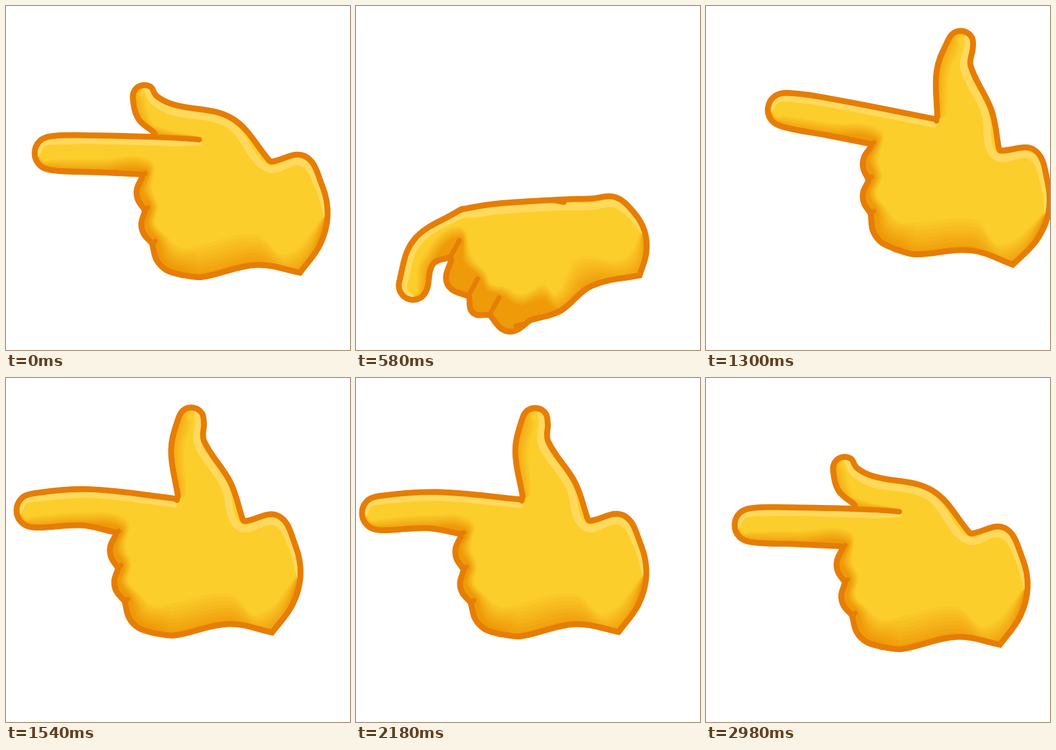
Animation of 512x512 px, one loop 3 s. Source, as an HTML page with a canvas:

```html
<!DOCTYPE html>
<html lang="en">
<head>
<meta charset="utf-8">
<title>Pointing hand</title>
<style>
html, body { margin: 0; width: 100%; height: 100%; overflow: hidden; background: #fff; }
canvas { display: block; width: 100vmin; height: 100vmin; }
</style>
</head>
<body>
<canvas id="stage"></canvas>
<script>
const SIZE = 512, LOOP = 3000, STEP = 20;
const canvas = document.getElementById('stage');
const ctx = canvas.getContext('2d');
const scale = Math.max(1, window.devicePixelRatio || 1);
canvas.width = canvas.height = SIZE * scale;

const YELLOW = [252, 206, 44], DARK = [238, 154, 9];
const EDGE = '#e67d05', LIGHT = '#ffd95c';
const EDGE_WIDTH = 8, BANDS = 9, THUMB_SIZE = 22;

// A pose holds the joints of the hand as x, y pairs.
// finger: tip centre, upper side, lower side
// thumb: crotch, left side, tip centre, right side, back, end of the inner line
// knuckles: four creases; wrist: notch, top, bottom; palm: heel, underside
// turn: finger angle and radius, thumb angle and radius, amount of curl
const aim = {
  finger: [46, 199, 110, 169, 115, 231],
  thumb: [269, 176, 258, 108, 291, 63, 314, 92, 354, 153, 274, 179],
  knuckles: [177, 234, 181, 285, 192, 335, 239, 384],
  wrist: [373, 208, 424, 200, 417, 381],
  palm: [351, 369, 270, 387],
  turn: [180, 29, -80, 23, 0]
};
const curl = {
  finger: [85, 412, 84, 341, 117, 383],
  thumb: [152, 297, 156, 295, 162, 294, 205, 287, 295, 281, 310, 284],
  knuckles: [138, 374, 165, 431, 197, 459, 261, 467],
  wrist: [350, 279, 387, 277, 425, 400],
  palm: [352, 416, 306, 453],
  turn: [105, 25, -110, 0, 1]
};
const PARTS = Object.keys(aim);

const mapPose = fn => Object.fromEntries(PARTS.map(part => [part, aim[part].map((_, i) => fn(part, i))]));
const halfway = (a, b) => mapPose((part, i) => (a[part][i] + b[part][i]) / 2);

// Shifts a pose, turning it about its first crease.
function move(pose, dx, dy, deg = 0) {
  const [px, py] = pose.knuckles;
  const c = Math.cos(deg * Math.PI / 180), s = Math.sin(deg * Math.PI / 180);
  return mapPose((part, i) => {
    const list = pose[part];
    if (part === 'turn') return list[i] + (i === 0 || i === 2 ? deg : 0);
    const x = list[i - i % 2] - px, y = list[i - i % 2 + 1] - py;
    return i % 2 ? py + dy + x * s + y * c : px + dx + x * c - y * s;
  });
}

const folded = {
  ...aim,
  thumb: [196, 171, 172, 150, 184, 115, 228, 123, 316, 144, 266, 175],
  turn: [180, 29, -100, 21, 0]
};
const point = move(folded, 22, 20);
const windup = move(aim, 65, -26, 8.5);
const back = move(aim, 13, 0);
const poke = { ...move(aim, -25, 1), finger: [34, 201, 120, 166, 105, 227] };
const droop = {
  ...halfway(point, curl),
  finger: [71, 314, 105, 254, 121, 308],
  thumb: [138, 244, 138, 238, 151, 234, 195, 231, 310, 237, 312, 242],
  knuckles: [168, 300, 183, 355, 202, 396, 246, 427],
  turn: [142, 24, -110, 9, 0.5]
};

const POKES = [1590, 1890, 2190];
const KEYS = [
  [0, point], [340, droop], [560, move(curl, 0, 4)], [940, curl], [1065, droop], [1310, windup],
  ...POKES.flatMap(time => [[time, poke], [time + 140, back]]),
  [2440, back], [LOOP, point]
];

// Monotone cubic interpolation: eases at turning points, flows through the rest.
function poseAt(time) {
  let k = 0;
  while (k < KEYS.length - 2 && time >= KEYS[k + 1][0]) k++;
  const span = KEYS[k + 1][0] - KEYS[k][0];
  const u = (time - KEYS[k][0]) / span;
  return mapPose((part, i) => {
    const value = j => KEYS[j][1][part][i];
    const slope = j => j < 0 || j > KEYS.length - 2 ? 0 :
      (value(j + 1) - value(j)) / (KEYS[j + 1][0] - KEYS[j][0]);
    const tangent = j => {
      const a = slope(j - 1), b = slope(j);
      return a * b > 0 ? 2 * a * b / (a + b) : 0;
    };
    return value(k) + (value(k + 1) - value(k)) * u * u * (3 - 2 * u) +
      span * u * (1 - u) * (tangent(k) * (1 - u) - tangent(k + 1) * u);
  });
}

const pairs = list => list.filter((_, i) => i % 2 === 0).map((x, i) => ({ x, y: list[i * 2 + 1] }));
const sharp = p => ({ ...p, corner: true });
const add = (p, x, y) => ({ x: p.x + x, y: p.y + y });

function unit(a, b) {
  const dx = b.x - a.x, dy = b.y - a.y, d = Math.hypot(dx, dy) || 1;
  return { x: dx / d, y: dy / d };
}

// Half circle around a fingertip that points along deg.
function cap(center, deg, radius) {
  return [-90, -45, 0, 45, 90].map(turn => {
    const a = (deg + turn) * Math.PI / 180;
    return add(center, Math.cos(a) * radius, Math.sin(a) * radius);
  });
}

// Points between a and b that bulge to the left of the way.
function bulge(a, b, amount, count) {
  return Array.from({ length: count }, (_, i) => {
    const u = (i + 1) / (count + 1), h = 4 * u * (1 - u) * amount;
    const dx = b.x - a.x, dy = b.y - a.y;
    return { x: a.x + dx * u + dy * h, y: a.y + dy * u - dx * h };
  });
}

// Smooth curve through points, with sharp turns at corners.
function trace(pts, { closed = false, join = false } = {}) {
  const n = pts.length;
  const at = i => closed ? pts[(i + n) % n] : pts[Math.min(n - 1, Math.max(0, i))];
  if (join) ctx.lineTo(pts[0].x, pts[0].y);
  else ctx.moveTo(pts[0].x, pts[0].y);
  for (let i = 0; i < (closed ? n : n - 1); i++) {
    const a = at(i), b = at(i + 1);
    const from = unit(a.corner ? a : at(i - 1), b);
    const to = unit(a, b.corner ? b : at(i + 2));
    const reach = Math.hypot(b.x - a.x, b.y - a.y) * 0.36;
    ctx.bezierCurveTo(a.x + from.x * reach, a.y + from.y * reach,
      b.x - to.x * reach, b.y - to.y * reach, b.x, b.y);
  }
}

// Moves points sideways, to the left of the way.
function offset(pts, depth) {
  return pts.map((p, i) => {
    const dir = unit(pts[Math.max(0, i - 1)], pts[Math.min(pts.length - 1, i + 1)]);
    const d = typeof depth === 'number' ? depth : depth[i];
    return { ...p, ...add(p, dir.y * d, -dir.x * d) };
  });
}

function stroke(pts, color, width, closed = false) {
  ctx.beginPath();
  trace(pts, { closed });
  ctx.strokeStyle = color;
  ctx.lineWidth = width;
  ctx.stroke();
}

const mix = t => `rgb(${YELLOW.map((c, i) => Math.round(DARK[i] + (c - DARK[i]) * t))})`;

// Stepped gradient between a rim and the same line pushed inwards.
function shade(pts, depths, rim, inset = 0) {
  for (let k = BANDS - 1; k >= 0; k--) {
    const t = k / BANDS;
    ctx.beginPath();
    trace(offset(pts, depths.map(d => inset + d * t)));
    trace(rim, { join: true });
    ctx.closePath();
    ctx.fillStyle = mix(t);
    ctx.fill();
  }
}

function draw(time) {
  const pose = poseAt(time);
  const [tip, upper, lower] = pairs(pose.finger);
  const [crotch, left, thumbTip, right, spine, lineEnd] = pairs(pose.thumb);
  const creases = pairs(pose.knuckles).map(sharp);
  const [notch, cuffTop, cuffEnd] = pairs(pose.wrist);
  const [heel, belly] = pairs(pose.palm);
  const [angle, radius, thumbAngle, thumbRadius, bent] = pose.turn;

  const fingerCap = cap(tip, angle, radius);
  const thumbCap = cap(thumbTip, thumbAngle, thumbRadius);
  const cuff = bulge(cuffTop, cuffEnd, 0.22, 3);
  const [c1, c2, c3, c4] = creases;
  const puff = 0.2 + 0.13 * bent;
  const underside = [
    sharp(cuffEnd), heel, belly,
    c4, ...bulge(c4, c3, puff, 2), c3, ...bulge(c3, c2, puff, 2), c2,
    ...bulge(c2, c1, puff, 2), c1, lower
  ];
  const hand = [
    ...fingerCap, upper, sharp(crotch), left, ...thumbCap, right, spine,
    sharp(notch), cuffTop, ...cuff, ...underside
  ];

  // The finger's upper edge runs on into the palm.
  const flow = unit(upper, crotch);
  const half = Math.hypot(lineEnd.x - crotch.x, lineEnd.y - crotch.y) / 4;
  const middle = {
    x: (crotch.x + lineEnd.x) / 4 + (crotch.x + flow.x * half * 2) / 2,
    y: (crotch.y + lineEnd.y) / 4 + (crotch.y + flow.y * half * 2) / 2
  };
  const line = [crotch, middle, lineEnd];

  ctx.setTransform(scale, 0, 0, scale, 0, 0);
  ctx.clearRect(0, 0, SIZE, SIZE);
  ctx.lineCap = ctx.lineJoin = 'round';
  ctx.save();
  ctx.beginPath();
  trace(hand, { closed: true });
  ctx.clip();
  ctx.fillStyle = mix(1);
  ctx.fillRect(0, 0, SIZE, SIZE);

  // Lower shading passes through the inner ends of the creases.
  const inner = creases.map(c => add(c, 8 + 8 * bent, -5 - 24 * bent));
  const [e1, e2, e3, e4] = inner;
  const fold = (a, b) => bulge(a, b, -0.2, 1);
  const deep = 1 - 0.45 * bent;
  shade(
    [...fingerCap.slice(0, 3).reverse(), lower, e1, ...fold(e1, e2), e2, ...fold(e2, e3), e3,
      ...fold(e3, e4), e4, belly, heel, cuffEnd, cuff[1]],
    [3, 9, 17, 20, 18, 16, 12, 13, 15, 34 * deep, 46 * deep, 52 * deep, 50, 38, 2],
    [cuff[2], ...underside, ...fingerCap.slice(0, 3)], 5);

  const thumbSide = [crotch, left, ...thumbCap.slice(0, 3)];
  shade([...thumbSide.slice().reverse(), lineEnd],
    [9, 17, 25, 25, 17, 0].map(d => d * thumbRadius / THUMB_SIZE), [lineEnd, ...thumbSide]);

  const ridge = [...thumbCap.slice(3), right, spine, notch, cuffTop, ...cuff.slice(0, 2)];
  stroke(offset(ridge, [-9, -12, -14, -14, -15, -14, -9, -4]), LIGHT, 11);
  stroke(offset([...fingerCap.slice(2), upper, ...line], [-7, -10, -12, -12, -12, -12, -8]), LIGHT, 9);

  stroke(hand, EDGE, EDGE_WIDTH * 2, true);
  stroke(offset(line, -4), EDGE, EDGE_WIDTH);
  creases.slice(0, 3).forEach((c, i) => stroke([c, inner[i]], EDGE, EDGE_WIDTH - 1));
  stroke([c4, add(c4, -23 * bent, 5 * bent)], EDGE, EDGE_WIDTH - 1);
  ctx.restore();
  stroke(hand, EDGE, 1.5, true);
}

function tick() {
  const time = performance.now() % LOOP;
  draw(Math.floor(time / STEP) * STEP);
  requestAnimationFrame(tick);
}
tick();
</script>
</body>
</html>
```
